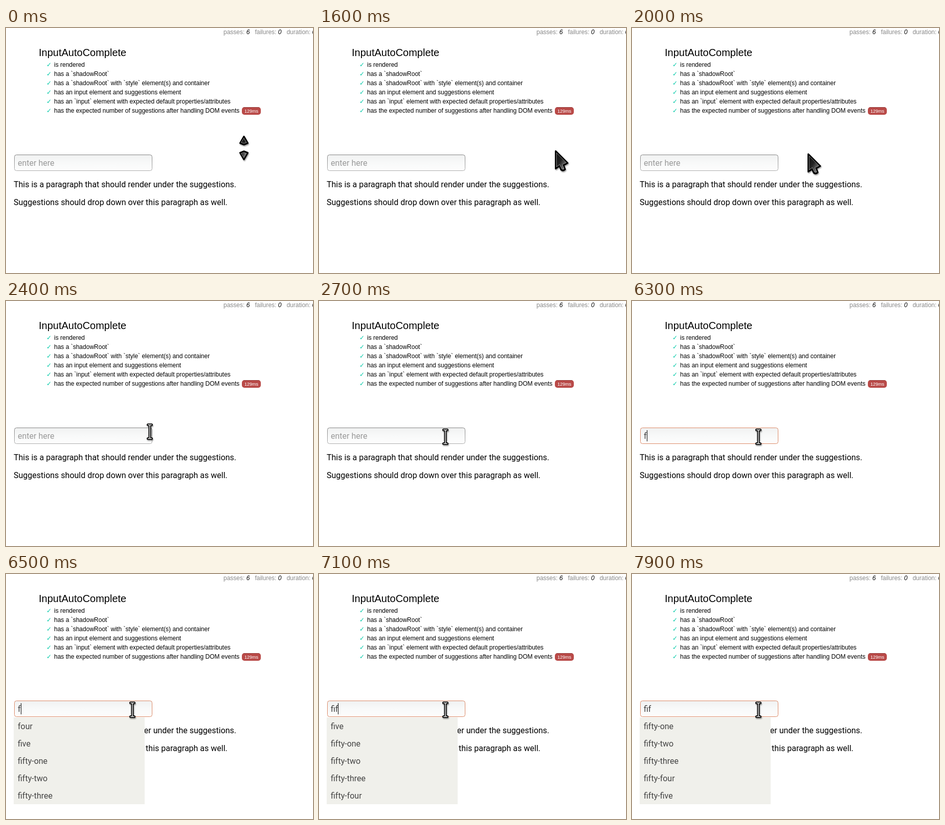
An HTML page for the animation above (8 s loop, 600 px wide and 480 px high).

```html
<!DOCTYPE html>
<html lang="en">
<head>
<meta charset="utf-8">
<title>Autocomplete demo</title>
<style>
  html, body { margin: 0; width: 100%; height: 100%; overflow: hidden; background: #fff; }
  svg { display: block; }
  text { white-space: pre; }
  .report { font: 12px "Liberation Sans", Arial, sans-serif; }
  .page { font: 16px Roboto, sans-serif; }
  .stats { fill: #888; }
  .stats .value { fill: #000; font-style: italic; }
  .tick { fill: #00c9a7; font-family: "DejaVu Sans", sans-serif; }
  .cursor { filter: drop-shadow(1px 2px 1px rgba(0, 0, 0, .4)); stroke-linejoin: round; stroke-linecap: round; }
  .rim { fill: #000; stroke: #000; stroke-width: 3; }
  .core { fill: url(#metal); stroke: #aaa; stroke-width: .8; }
</style>
</head>
<body>
<svg width="600" height="480" viewBox="0 0 600 480">
  <defs>
    <linearGradient id="field" x2="0" y2="1">
      <stop stop-color="#f0f1f1"/><stop offset=".5" stop-color="#f8f9f9"/><stop offset="1" stop-color="#fdfdfd"/>
    </linearGradient>
    <linearGradient id="edge" x2="0" y2="1">
      <stop stop-color="#858585"/><stop offset="1" stop-color="#adadad"/>
    </linearGradient>
    <linearGradient id="metal" x2="1" y2="1">
      <stop stop-color="#111"/><stop offset=".45" stop-color="#222"/><stop offset="1" stop-color="#999"/>
    </linearGradient>
  </defs>

  <g class="report">
    <g class="stats">
      <text x="425" y="12">passes: <tspan class="value">6</tspan></text>
      <text x="486.4" y="12">failures: <tspan class="value">0</tspan></text>
      <text x="548.4" y="12">duration: <tspan class="value">0</tspan></text>
    </g>
    <text x="64" y="55" font-size="20">InputAutoComplete</text>
    <g id="tests"></g>
    <rect x="461" y="155" width="37" height="15" rx="5" fill="#b94a48"/>
    <path d="M464 155.5h31" stroke="#000" stroke-opacity=".2"/>
    <text x="466" y="166" font-size="9" fill="#fff">129ms</text>
  </g>

  <g class="page">
    <text x="15" y="312">This is a paragraph that should render under the suggestions.</text>
    <text x="15" y="347">Suggestions should drop down over this paragraph as well.</text>
    <rect id="box" x="16.5" y="248.5" width="269" height="31" rx="4" fill="url(#field)"/>
    <text id="typed" x="23" y="270"></text>
    <rect id="caret" y="253" width="1" height="22"/>
    <g id="menu" fill="#444">
      <rect x="15" y="281" width="256" height="170" fill="#f0f0eb"/>
    </g>
  </g>

  <g id="resize" class="cursor"></g>
  <g id="arrow" class="cursor"></g>
  <g id="beam" class="cursor" fill="none">
    <path d="M-3.5-13.5h7M0-13.5v27M-3.5 13.5h7" stroke="#000" stroke-width="5"/>
    <path d="M-3.5-13.5h7M0-13.5v27M-3.5 13.5h7" stroke="#eee" stroke-width="1.5"/>
  </g>
</svg>
<script>
const $ = id => document.getElementById(id);
const show = (id, on) => $(id).setAttribute('visibility', on ? 'visible' : 'hidden');

function add(parent, tag, attrs, content = '') {
  const el = document.createElementNS('http://www.w3.org/2000/svg', tag);
  for (const key in attrs) el.setAttribute(key, attrs[key]);
  el.textContent = content;
  return parent.appendChild(el);
}

[
  'is rendered',
  'has a `shadowRoot`',
  'has a `shadowRoot` with `style` element(s) and container',
  'has an input element and suggestions element',
  'has an `input` element with expected default properties/attributes',
  'has the expected number of suggestions after handling DOM events'
].forEach((name, i) => {
  const y = 76 + 18 * i;
  add($('tests'), 'text', { x: 79, y, class: 'tick' }, '✓');
  add($('tests'), 'text', { x: 94, y }, name);
});

// Cursor shapes: a black rim with a metallic core
function metal(id, rim, core) {
  add($(id), 'path', { d: rim, class: 'rim' });
  add($(id), 'path', { d: core, class: 'core' });
}
metal('arrow',
  'M1.5 2V36.5L9 31.5L12 38.5Q16 42 20 38L17 30L25 25.5Z',
  'M3 6V33L9.5 28.5L13.5 37Q16 39 18 37L14.5 28.5L22 25Z');
metal('resize',
  'M465 212.5L472.5 225.5L465 228.5L457.5 225.5Z M465 257.5L472.5 244.5L465 241.5L457.5 244.5Z',
  'M465 216L470 224.5L465 226L460 224.5Z M465 254L470 245.5L465 244L460 245.5Z');

// Each entry holds from its time (ms) until the next one
const pointer = [
  [0, 'resize', 0, 0], [100, 'arrow', 463, 234],
  [1600, 'arrow', 461, 239], [1700, 'arrow', 437, 240], [1800, 'arrow', 405, 241],
  [1900, 'arrow', 373, 243], [2000, 'arrow', 343, 245], [2100, 'arrow', 313, 249],
  [2200, 'arrow', 290, 253],
  [2400, 'beam', 281, 256], [2500, 'beam', 267, 260], [2600, 'beam', 253, 264],
  [2700, 'beam', 247, 266]
];
const typing = [[0, '', 23], [6300, 'f', 29], [6700, 'fi', 32], [7100, 'fif', 37]];
const menus = [[0, ''], [6500, 'f'], [6800, 'fi'], [7200, 'fif']];
const words = ['four', 'five', 'one', 'two', 'three', 'four', 'five']
  .map((word, i) => i < 2 ? word : 'fifty-' + word);
const rows = words.slice(0, 5).map((_, i) => add($('menu'), 'text', { x: 23, y: 304 + 34 * i }));
const at = (track, t) => track.findLast(entry => entry[0] <= t);

function draw(now) {
  const t = now % 8000;

  const [, shape, x, y] = at(pointer, t);
  for (const id of ['resize', 'arrow', 'beam']) show(id, id === shape);
  $(shape).setAttribute('transform', `translate(${x} ${y})`);

  const focused = t >= 4400;
  $('box').setAttribute('stroke', focused ? '#dc8a68' : 'url(#edge)');

  const [, text, caretX] = at(typing, t);
  $('typed').textContent = text || 'enter here';
  $('typed').setAttribute('fill', text ? '#3c3c3c' : '#999');
  $('caret').setAttribute('x', caretX);
  show('caret', focused && !(t >= 5600 && t < 6300) && t < 7900);

  const [, prefix] = at(menus, t);
  show('menu', prefix);
  const matches = words.filter(word => word.startsWith(prefix));
  rows.forEach((row, i) => row.textContent = matches[i]);

  requestAnimationFrame(draw);
}
requestAnimationFrame(draw);
</script>
</body>
</html>
```
